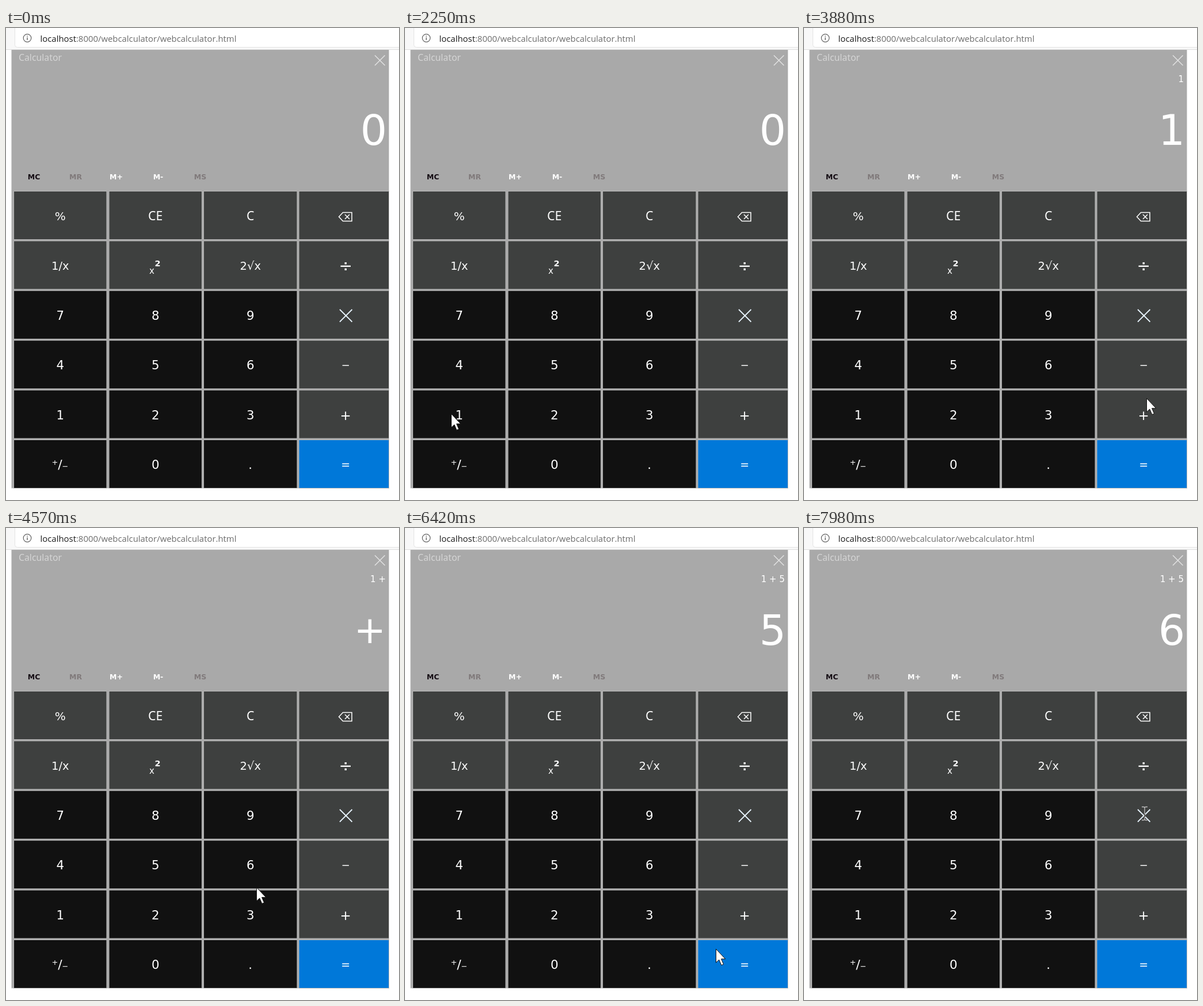
An HTML page for the animation above (8000 ms loop, 683 px wide and 820 px high).

```html
<!DOCTYPE html>
<html lang="en">
<head>
<meta charset="utf-8">
<title>Calculator</title>
<style>
  html, body { margin: 0; width: 100%; height: 100%; overflow: hidden; background: #fff; }
  svg { display: block; width: 683px; height: 820px; }
  text { font-family: "DejaVu Sans", sans-serif; fill: #fff; text-anchor: middle; white-space: pre; }
  .sans { font-family: "Noto Sans", sans-serif; }
  .url { font: 14.9px "Open Sans", sans-serif; text-anchor: start; fill: #6c6c6c; }
  .memory { font-size: 12.5px; font-weight: bold; }
  .line { fill: none; stroke: #fff; stroke-width: 1.5; }
  #expression { font-size: 15px; text-anchor: end; }
  #beam { mix-blend-mode: difference; }
</style>
</head>
<body>
<svg viewBox="0 0 683 820">
  <rect width="683" height="820" fill="#fff"/>
  <rect width="683" height="37" fill="#f8f8f8"/>
  <rect x="15.5" y="-4" width="690" height="37.5" rx="4" fill="#fff" stroke="#e3e3e3"/>
  <path d="M0 37.5H683" stroke="#dcdcdc"/>
  <circle cx="37" cy="17.5" r="6.8" fill="none" stroke="#606060" stroke-width="1.2"/>
  <path d="M37 16.3v4.8M37 13.6v1.5" stroke="#606060" stroke-width="1.4"/>
  <text class="url" x="59.5" y="24"><tspan fill="#1c1c1c">localhost</tspan>:8000/webcalculator/webcalculator.html</text>

  <rect x="9.5" y="38" width="656" height="761.5" fill="#a9a9a9"/>
  <text class="sans" x="22" y="57" font-size="15.8" style="text-anchor:start;fill:#d5d5d5">Calculator</text>
  <path class="line" d="M641 47.5l17.5 17.5M658.5 47.5L641 65" style="stroke:#e2e2e2"/>
  <text id="expression" x="660" y="94"></text>
  <text id="result"></text>
  <g id="memory"></g>
  <g id="buttons"></g>

  <text x="253.5" y="426.5" font-size="15">x</text>
  <text x="263.5" y="414" font-size="14.5" font-weight="bold">2</text>
  <text x="85" y="759" font-size="13">+</text>
  <text x="94" y="766" font-size="22">/</text>
  <text x="103" y="766" font-size="13">−</text>
  <path class="line" d="M578.5 328l7-7.5H601v15h-15.500zM589 324l8 8M597 324l-8 8"/>
  <path class="line" d="M580 489l21.500 21.500M601.500 489L580 510.500" style="stroke:#e9f5ff;stroke-width:1.8"/>

  <path id="arrow" d="M.5 .5V24l5.300-4.900 4 9.400 3.800-1.600-4-9.200h7.200z" fill="#fff" stroke="#111" stroke-linejoin="round"/>
  <path id="beam" d="M-5-11.500h3q2 0 2 2 0-2 2-2h3M0-10v20M-5 11.500h3q2 0 2-2 0 2 2 2h3" fill="none" stroke="#fff" stroke-width="1.3"/>
</svg>
<script>
const LOOP = 8000;
const $ = id => document.getElementById(id);

function add(parent, tag, attrs, content = '') {
  const node = document.createElementNS('http://www.w3.org/2000/svg', tag);
  for (const key in attrs) node.setAttribute(key, attrs[key]);
  node.textContent = content;
  return parent.appendChild(node);
}

[['MC', 48.5, '#150c14'], ['MR', 121, '#807a7b'], ['M+', 191.500, '#fff'],
 ['M-', 264.500, '#fff'], ['MS', 337.500, '#807a7b']].forEach(([label, x, color]) =>
  add($('memory'), 'text', { x, y: 263, class: 'memory', style: `fill:${color}` }, label));

// Labels left empty are drawn as separate glyphs or icons.
const labels = [['%', 'CE', 'C', ''], ['1/x', '', '2√x', '÷'], ['7', '8', '9', ''],
                ['4', '5', '6', '−'], ['1', '2', '3', '+'], ['', '0', '.', '=']];
const sizes = { '%': 20, '1/x': 19.5, '2√x': 19.5, '÷': 28, '−': 18, '+': 23, '=': 19 };
const drops = { '÷': 3, '−': -1, '+': 1, '=': -1 };
const columns = [[14, 160.5], [179.5, 160.5], [344, 161.5], [509.5, 155.5]];
const keys = {};

labels.forEach((row, r) => row.forEach((label, c) => {
  const [x, width] = columns[c], y = 284 + r * 86.400;
  const fill = r === 5 && c === 3 ? '#0078d9' : r > 1 && c < 3 ? '#111' : '#3e403f';
  add($('buttons'), 'rect', { x: x - 1, y: y - 1, width: width + 2, height: 85, fill: '#b9b9b9' });
  const face = add($('buttons'), 'rect', { x, y, width, height: 83, fill });
  if (!label) return;
  keys[label] = { face, fill };
  add($('buttons'), 'text', {
    x: x + width / 2 + (c === 3 ? 3 : 0), y: 334 + r * 86.400 + (drops[label] || 0),
    'font-size': sizes[label] || 21.3, class: /C/.test(label) ? 'sans' : ''
  }, label);
}));

// start, expression, result, result x, baseline, font size
const displays = [[0, '', '0', 639, 203, 73], [2500, '1', '1', 639, 203, 73],
  [4420, '1 +', '+', 632.500, 200, 66], [5110, '1 + 5', '5', 639, 203, 73],
  [6740, '1 + 5', '6', 639, 203, 73]];
const presses = [['1', 2500, 2570, '#303030'], ['+', 4420, 4490, '#585858'],
  ['5', 5110, 5340, '#303030'], ['=', 6740, 6890, '#1a86db']];

// Pointer captures: first step, last step, step count
const runs = [[70, 610, 8], [760, 1530, 11], [1600, 1750, 3], [1920, 1920, 1], [2070, 2070, 1],
  [2250, 2330, 2], [2500, 3270, 11], [3340, 4040, 10], [4250, 4250, 1], [4420, 4960, 8],
  [5340, 6110, 11], [6190, 6570, 6], [6890, 7660, 11], [7740, 7980, 4]];
const path = [[0, 690, 880], [70, 629, 792], [610, 152, 195], [690, 152, 195], [1140, 80, 530],
  [1530, 64, 657], [1750, 74, 668], [1920, 76, 670], [2070, 78, 670], [2250, 80, 670],
  [2330, 68, 659], [2420, 68, 659], [2880, 528, 550], [3270, 598, 453], [4040, 594, 666],
  [4250, 582, 666], [4340, 582, 666], [4570, 437, 625], [4960, 273, 585], [5260, 273, 585],
  [5650, 365, 660], [6110, 485, 714], [6570, 550, 734], [6820, 550, 734], [6890, 544, 738],
  [7270, 461, 655], [7660, 536, 593], [7980, 592, 496]];

function captureTime(t) {
  const run = runs.filter(r => r[0] <= t).pop();
  if (!run) return 0;
  const [start, end, count] = run;
  if (count === 1) return start;
  const step = (end - start) / (count - 1);
  return start + step * Math.min(count - 1, Math.floor((t - start + 6) / step));
}

const slope = (i, axis) => (path[i + 1][axis] - path[i][axis]) / (path[i + 1][0] - path[i][0]);

function tangent(i, axis) {
  if (i === 0 || i === path.length - 1) return 0;
  const a = slope(i - 1, axis), b = slope(i, axis);
  return a * b > 0 ? 2 * a * b / (a + b) : 0;
}

// Monotone cubic through the waypoints
function pointer(t, axis) {
  let i = 0;
  while (i < path.length - 2 && path[i + 1][0] <= t) i++;
  const span = path[i + 1][0] - path[i][0];
  const u = Math.min(1, (t - path[i][0]) / span), v = 1 - u;
  return path[i][axis] * v * v * (1 + 2 * u) + path[i + 1][axis] * u * u * (1 + 2 * v)
    + span * u * v * (tangent(i, axis) * v - tangent(i + 1, axis) * u);
}

const overSymbol = (x, y) => Math.abs(x - 590) < 12 && [499, 585, 671].some(row => Math.abs(y - row) < 13);

function draw(t) {
  const [, expression, result, rx, ry, size] = displays.filter(d => d[0] <= t).pop();
  $('expression').textContent = expression;
  $('result').textContent = result;
  $('result').setAttribute('x', rx);
  $('result').setAttribute('y', ry);
  $('result').setAttribute('font-size', size);

  for (const [label, from, to, color] of presses)
    keys[label].face.setAttribute('fill', t >= from && t < to ? color : keys[label].fill);

  const at = captureTime(t), x = Math.round(pointer(at, 1)), y = Math.round(pointer(at, 2));
  const beam = overSymbol(x, y);
  for (const id of ['arrow', 'beam']) {
    $(id).setAttribute('transform', `translate(${x} ${y})`);
    $(id).style.display = (id === 'beam') === beam ? '' : 'none';
  }
}

let began;
function tick(now) {
  began ??= now;
  draw((now - began) % LOOP);
  requestAnimationFrame(tick);
}
draw(0);
requestAnimationFrame(tick);
</script>
</body>
</html>
```
